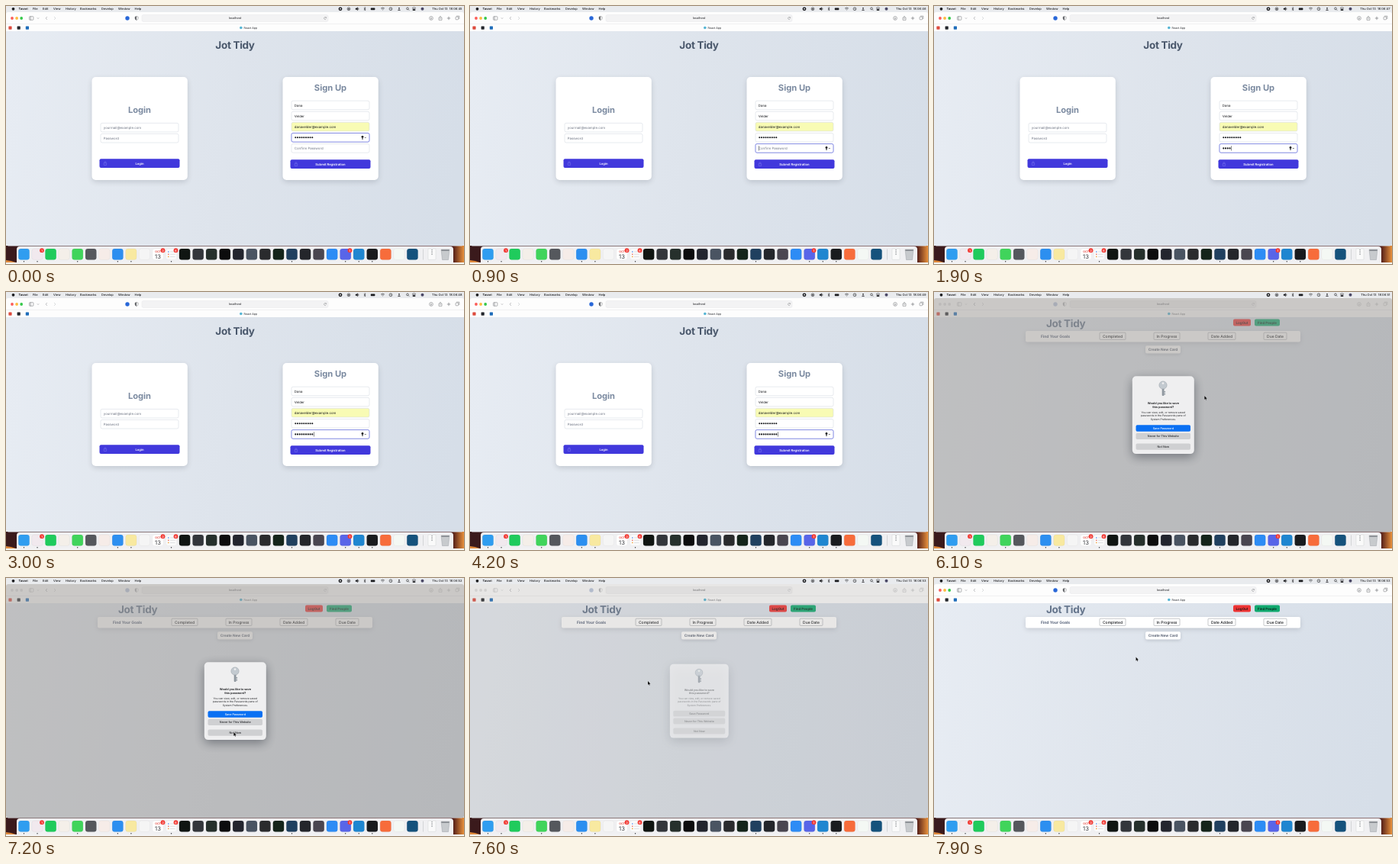
These frames come from a looping animation (600x338 px, 8000 ms). An HTML page with a canvas:

```html
<!DOCTYPE html>
<html lang="en">
<head>
<meta charset="utf-8">
<title>Sign up</title>
<style>
html, body { margin: 0; width: 100%; height: 100%; overflow: hidden; background: #f1f1f3; }
canvas { display: block; width: 600px; height: 338px; }
</style>
</head>
<body>
<canvas id="stage"></canvas>
<script>
const LOOP = 8000, PAGE_SWITCH = 5300, CONFIRM_FOCUS = 900;
const PROMPT_OPEN = 5750, PROMPT_CLOSE = 7390;
const canvas = document.getElementById('stage');
const c = canvas.getContext('2d');
const dpr = window.devicePixelRatio || 1;
canvas.width = 600 * dpr;
canvas.height = 338 * dpr;

const clamp = v => Math.max(0, Math.min(1, v));
const ease = v => (v = clamp(v), v * v * (3 - 2 * v));
const promptShown = t => ease((t - PROMPT_OPEN) / 250) * (1 - ease((t - PROMPT_CLOSE) / 390));

function box(x, y, w, h, r, fill, stroke, line = 0.5) {
  c.beginPath();
  c.roundRect(x, y, w, h, r);
  if (fill) { c.fillStyle = fill; c.fill(); }
  if (stroke) { c.strokeStyle = stroke; c.lineWidth = line; c.stroke(); }
}
function dot(x, y, r, fill, stroke, line = 0.6) {
  c.beginPath();
  c.arc(x, y, r, 0, 7);
  if (fill) { c.fillStyle = fill; c.fill(); }
  if (stroke) { c.strokeStyle = stroke; c.lineWidth = line; c.stroke(); }
}
function path(d, x, y, stroke, fill, line = 0.6) {
  const p = new Path2D(d);
  c.save();
  c.translate(x, y);
  if (fill) { c.fillStyle = fill; c.fill(p); }
  if (stroke) { c.strokeStyle = stroke; c.lineWidth = line; c.stroke(p); }
  c.restore();
}
// Laid out large and scaled down, so that tiny text keeps its true spacing
function text(s, x, y, size, color, weight = 400, align = 'left', spacing = 0) {
  const k = size / 48;
  c.save();
  c.translate(x, y);
  c.scale(k, k);
  c.font = `${weight} 48px Inter, sans-serif`;
  c.textRendering = 'geometricPrecision';
  c.letterSpacing = spacing / k + 'px';
  c.textAlign = align;
  c.fillStyle = color;
  c.fillText(s, 0, 0);
  c.restore();
}
function shadow(blur, y, alpha, draw) {
  c.save();
  c.shadowColor = `rgba(24,30,42,${alpha})`;
  c.shadowBlur = blur * dpr;
  c.shadowOffsetY = y * dpr;
  draw();
  c.restore();
}

// Menu bar
const MENUS = [['File', 35], ['Edit', 48], ['View', 62], ['History', 78], ['Bookmarks', 97],
  ['Develop', 125], ['Window', 147], ['Help', 168.5]];

function menuBar(t) {
  const ink = '#1c1d20';
  box(0, 0, 600, 12, 0, '#e9ebee');
  dot(9.5, 3.8, 1.9, ink);
  text('Tavori', 16.5, 5.3, 4, ink, 700);
  for (const [name, x] of MENUS) text(name, x, 5.3, 4, ink, 500);
  dot(438, 3.8, 2.4, ink);
  box(437.2, 3, 1.6, 1.6, 0, '#fff');
  dot(449, 3.8, 1.9, null, ink);
  dot(449, 3.8, 0.9, ink);
  path('M-2-.8h1.2l1.5-1.2v4l-1.5-1.2H-2zM1.6-1.3q1 1.3 0 2.6', 460, 3.8, ink, ink, 0.4);
  path('M-1.2-1.1 1.2 1.1 0 2.2V-2.2L1.2-1.1-1.2 1.1', 470, 3.8, ink, null, 0.5);
  box(477.8, 2.4, 5.6, 2.8, 0.7, ink);
  path('M-2.4-.7q2.4-2 4.8 0M-1.4.5q1.4-1.2 2.8 0M0 1.3v.4', 493.5, 3.8, ink);
  dot(504, 3.8, 1.9, null, ink);
  path('M0-1.1V0l.9.5', 504, 3.8, ink, null, 0.5);
  dot(515, 2.8, 0.9, ink);
  path('M-2 2q2-2.8 4 0z', 515, 3.8, null, ink);
  dot(526, 3.4, 1.4, null, ink);
  path('M0 0 1.3 1.3', 527, 4.4, ink);
  box(532.5, 1.9, 4, 1.6, 0.8, null, ink);
  box(532.5, 4.3, 4, 1.6, 0.8, ink);
  dot(545.5, 3.8, 2, '#4b4866');
  const second = 45 + Math.floor((t + 600) / 1000);
  text('Thu Oct 13  18:06:' + second, 597.5, 5.3, 4, ink, 500, 'right');
}

// Browser window; its controls turn pale while the prompt is open
function browser(active) {
  const gray = active ? '#66686c' : '#b4b6b9';
  const lights = active ? ['#fc5b57', '#fdbc40', '#34c84a'] : Array(3).fill('#e2e2e3');
  box(0, 8, 600, 306.3, 3, '#fdfdfd');
  lights.forEach((col, i) => dot(8 + 6.1 * i, 16, 1.9, col));
  box(30.5, 13.7, 5.4, 4.6, 0.8, null, gray);
  path('M-1-2.3v4.6', 33.2, 16, gray);
  path('M-1-.5 0 .5 1-.5', 42, 16, gray, null, 0.5);
  path('M1-2-1 0 1 2', 53, 16, '#9b9da1');
  path('M-1-2 1 0-1 2', 64, 16, '#c5c7ca');
  dot(159, 16, 2.7, active ? '#2867d8' : '#b9c6de');
  path('M0-2.5 2-1.8V.2Q2 1.9 0 2.6-2 1.9-2 .2V-1.8z', 171, 16, gray, null, 0.5);
  path('M0-2.5V2.6Q-2 1.9-2 .2V-1.8z', 171, 16, null, gray);
  box(178, 11.5, 244, 9, 2, '#f3f3f4', '#e3e3e5', 0.4);
  text('localhost', 300, 17.4, 3.8, active ? '#303135' : '#77797d', 500, 'center');
  path('M1.4-.6A1.5 1.5 0 1 0 1.4.7M1.6-1.8v1.3H.3', 418, 16, gray, null, 0.4);
  dot(557, 16, 2.4, null, gray, 0.5);
  path('M0-1.3V1.2M-.9.3 0 1.2.9.3', 557, 16, gray, null, 0.5);
  path('M-.8-.8H-2V2.4H2V-.8H.8M0 1V-2.6M-1-1.6 0-2.6 1-1.6', 569, 16, gray, null, 0.5);
  path('M-2.2 0h4.4M0-2.2v4.4', 580, 16, gray);
  box(589, 14.2, 3.6, 3.6, 0.7, null, gray, 0.5);
  path('M-1-2.8h3.8V1', 591, 16, gray, null, 0.5);

  box(0, 23.6, 600, 0.5, 0, '#e4e4e6');
  ['#dd4a3d', '#24272c', '#1f6dba'].forEach((col, i) => box(3.4 + 11.2 * i, 26.5, 4.2, 4.2, 0.6, col));
  dot(307.8, 28.5, 1.8, '#55b5d5');
  text('React App', 311.5, 29.9, 3.6, active ? '#46484d' : '#85878b', 500);

  const sky = c.createLinearGradient(0, 60, 600, 140);
  sky.addColorStop(0, '#e7ecf3');
  sky.addColorStop(0.5, '#dee4ec');
  sky.addColorStop(1, '#d6dee8');
  box(0, 33, 600, 281.3, [0, 0, 3, 3], sky);
}

// Forms
function field(x, y, value, { fill = '#fff', ink = '#6b7280', focus = false } = {}) {
  if (focus) box(x - 0.5, y - 0.5, 103, 12.6, 2.4, '#dfe3fb');
  box(x, y, 102, 11.6, 2, fill, focus ? '#6c74dc' : '#cfd4dc', focus ? 0.8 : 0.5);
  if (value) text(value, x + 3.8, y + 7.4, 4.35, ink);
}
function secret(y, count, { focus, caret }) {
  field(374, y, '', { focus });
  for (let i = 0; i < count; i++) dot(379.3 + 2.75 * i, y + 5.8, 1.05, '#14161a');
  if (caret) box(378.3 + 2.75 * count, y + 2.6, 0.5, 6.4, 0, '#14161a');
  if (!focus) return;
  dot(467, y + 4.8, 1.4, '#14161a');
  box(466.5, y + 5.5, 1, 3, 0.3, '#14161a');
  path('M-1-.4 0 .6 1-.4', 470.8, y + 5.8, '#14161a', null, 0.6);
}
function submit(x, y, label) {
  box(x, y, 105, 11.8, 2, '#4138dc');
  box(x + 5.6, y + 5.4, 3.6, 2.8, 0.5, null, '#7f7af0', 0.5);
  path('M-1.1 0v-.8a1.1 1.1 0 0 1 2.2 0V0', x + 7.4, y + 5.4, '#7f7af0', null, 0.5);
  text(label, x + 52.5, y + 7.4, 4.15, '#fff', 600, 'center');
}
function signUpPage(t) {
  text('Jot Tidy', 300, 56, 13.5, '#4a586c', 700, 'center', -0.3);
  for (const x of [112.5, 362.5]) shadow(7, 2.5, 0.16, () => box(x, 93, 125.3, 135, 5, '#fff'));

  const heading = '#7b8aa0';
  text('Login', 175, 139.5, 11.1, heading, 700, 'center');
  field(124, 153.4, 'yourmail@example.com');
  field(124, 167.4, 'Password');
  submit(122.5, 200.3, 'Login');

  text('Sign Up', 425, 111, 11.2, heading, 700, 'center');
  const ink = '#14161a';
  field(374, 124.2, 'Dana', { ink });
  field(374, 138.3, 'Velder', { ink });
  field(374, 152.4, 'danavelder@example.com', { ink, fill: '#f8fbb4' });

  const confirming = t >= CONFIRM_FOCUS;
  const typed = Math.max(0, Math.min(9, Math.floor((t - 1050) / 210)));
  const caret = (typed > 0 && typed < 9) || t % 1100 > 550;
  secret(166.5, 9, { focus: !confirming, caret: !confirming && caret });
  secret(180.6, typed, { focus: confirming, caret: confirming && caret });
  if (!typed) text('Confirm Password', 377.8, 188, 4.35, '#6b7280');
  submit(372.5, 201.3, 'Submit Registration');
}

// Board
function boardPage() {
  text('Jot Tidy', 147, 46, 13.5, '#64748b', 700, 'left', -0.3);
  box(392, 35.5, 23, 9, 2, '#ee3434');
  text('LogOut', 403.5, 41.7, 4.5, '#1b1010', 600, 'center');
  box(420, 35.5, 33, 9, 2, '#10a96f');
  text('Find People', 436.5, 41.7, 4.4, '#0b2019', 600, 'center');
  shadow(6, 2, 0.15, () => box(120, 51, 360, 14.5, 2, '#fff'));
  text('Find Your Goals', 159, 59.7, 5, '#56627a', 700, 'center');
  for (const [label, x, w] of [['Completed', 217, 34], ['In Progress', 288, 34],
    ['Date Added', 359, 36], ['Due Date', 432, 30]]) {
    box(x, 53.2, w, 9.2, 1, '#fff', '#8d9096', 0.5);
    text(label, x + w / 2, 59.6, 5, '#17191d', 500, 'center');
  }
  shadow(4, 1.2, 0.18, () => box(277, 70.3, 46, 10.2, 2, '#fff'));
  text('Create New Card', 300, 77.1, 4.7, '#465064', 600, 'center');
}

// Save-password prompt
function prompt(t) {
  const shown = promptShown(t), active = t < PROMPT_CLOSE;
  if (!shown) return;
  box(0, 8, 600, 306.3, 3, `rgba(152,148,143,${0.5 * shown})`);

  const scale = 0.91 + 0.09 * shown;
  c.save();
  c.globalAlpha = Math.min(1, shown * 1.75);
  c.translate(300.3, 161.2);
  c.scale(scale, scale);
  c.translate(-300.3, -161.2);
  shadow(14, 4, 0.45 * shown, () => box(259.8, 110.3, 81, 101.8, 5, '#efeff0'));

  box(298.7, 125, 2.8, 11, 1, '#8f979f');
  box(301.3, 130, 1.8, 1.6, 0, '#8f979f');
  box(301.3, 132.8, 1.8, 1.6, 0, '#8f979f');
  dot(300, 122, 5.1, '#c3cad0', '#9fa7ae', 0.6);
  dot(300, 119.6, 1.3, '#efeff0');

  const ink = active ? '#28292c' : '#77797c';
  const line = (s, y, size, weight) => text(s, 300.3, y, size, ink, weight, 'center');
  line('Would you like to save', 147, 3.8, 700);
  line('this password?', 151.8, 3.8, 700);
  line('You can view, edit, or remove saved', 158.5, 3.4, 400);
  line('passwords in the Passwords pane of', 163.2, 3.4, 400);
  line('System Preferences.', 167.9, 3.4, 400);
  [['Save Password', 174.3], ['Never for This Website', 184.7], ['Not Now', 198.4]].forEach(([label, y], i) => {
    const primary = i === 0 && active;
    box(264.5, y, 71.5, 8.4, 1.8, primary ? '#0a70f3' : '#cfd0d2');
    text(label, 300.3, y + 5.5, 3.75, primary ? '#fff' : ink, 500, 'center');
  });
  c.restore();
}

// Dock
const DOCK = ['#2f9df0', '#f1e9ee', '#1fcb5c', '#f4efe9', '#40d45b', '#55585d', '#f6ece8', '#2c8ff0',
  '#f8e9a0', '#f5f5f5', '#ffffff', '#fafafa', '#101512', '#33363b', '#26302c', '#0c0c0d', '#23252e',
  '#4a5462', '#2a2b2d', '#14241a', '#20405f', '#24262b', '#4a4650', '#2d8cf5', '#5865e8', '#1f86d0',
  '#191b1e', '#f76c3b', '#f4f8f4', '#15527c'];
const RUNNING = [0, 1, 4, 7, 8, 11, 20, 24, 25, 26];

function dock() {
  const wallpaper = c.createLinearGradient(0, 336, 600, 337);
  wallpaper.addColorStop(0, '#3a1a1c');
  wallpaper.addColorStop(0.975, '#4a1716');
  wallpaper.addColorStop(1, '#e8913c');
  box(0, 314, 600, 24, 0, '#f4f4f5');
  box(0, 314, 600, 22, 0, wallpaper);
  path('M0 0Q7 .5 13 3H0z', 0, 333, null, '#e08a3c');
  box(14, 315, 572, 21, [4, 4, 0, 0], '#f0f0f2');
  DOCK.forEach((col, i) => {
    const x = 23.5 + 17.55 * i;
    box(x - 7.2, 318, 14.4, 14.4, 3.2, col, 'rgba(0,0,0,.12)', 0.3);
    if (RUNNING.includes(i)) dot(x, 334.8, 0.7, '#303236');
  });
  text('OCT', 199, 322.8, 3.5, '#e4473e', 700, 'center');
  text('13', 199, 330.6, 7.6, '#33353a', 400, 'center');
  for (let i = 0; i < 3; i++) {
    dot(212.8, 322 + 3.2 * i, 0.8, ['#3b82f0', '#ea5246', '#f2a33a'][i]);
    box(215, 321.7 + 3.2 * i, 6.5, 0.5, 0, '#c4c6ca');
  }
  for (const [x, n] of [[47, '1'], [205.5, '2'], [222.5, '6'], [450.5, '1']]) {
    dot(x, 320.2, 2.9, '#f23c36');
    text(n, x, 321.5, 3.6, '#fff', 600, 'center');
  }
  box(546, 318.5, 0.5, 14, 0, '#b5b7bb');
  box(553, 318, 10, 14.4, 0.8, '#fafafa', '#c8cacd', 0.4);
  for (let i = 0; i < 4; i++) box(557.4, 319 + 2 * i, 1.3, 1, 0, '#85888d');
  path('M-5.4-6.5H5.4L4 7H-4z', 575.5, 325.5, '#9da1a6', '#c7cacd', 0.5);
  path('M-5.4-6.5H5.4L5-4.5H-5z', 575.5, 325.5, null, '#8e9297');
}

// Pointer: time, x, y
const ROUTE = [[4700, 432, 206], [5250, 425, 206], [5600, 390, 207], [6100, 354.3, 136], [6700, 302, 201],
  [7300, 298, 202], [7600, 233, 135], [7900, 264.5, 103.5], [8000, 266, 102]];

function pointer(t) {
  const i = ROUTE.findIndex(p => p[0] > t);
  if (i < 1) return;
  const [a, b] = [ROUTE[i - 1], ROUTE[i]];
  const k = ease((t - a[0]) / (b[0] - a[0]));
  path('M0 0V5L1.1 4 1.9 5.7 2.7 5.3 2 3.8H3.5z',
    a[1] + (b[1] - a[1]) * k, a[2] + (b[2] - a[2]) * k, 'rgba(255,255,255,.6)', '#000', 0.25);
}

function frame(now) {
  const t = now % LOOP;
  c.setTransform(dpr, 0, 0, dpr, 0, 0);
  menuBar(t);
  dock();
  browser(!promptShown(t));
  if (t < PAGE_SWITCH) signUpPage(t);
  else boardPage();
  prompt(t);
  pointer(t);
}

const start = performance.now();
(function tick() {
  frame(performance.now() - start);
  requestAnimationFrame(tick);
})();
</script>
</body>
</html>
```
